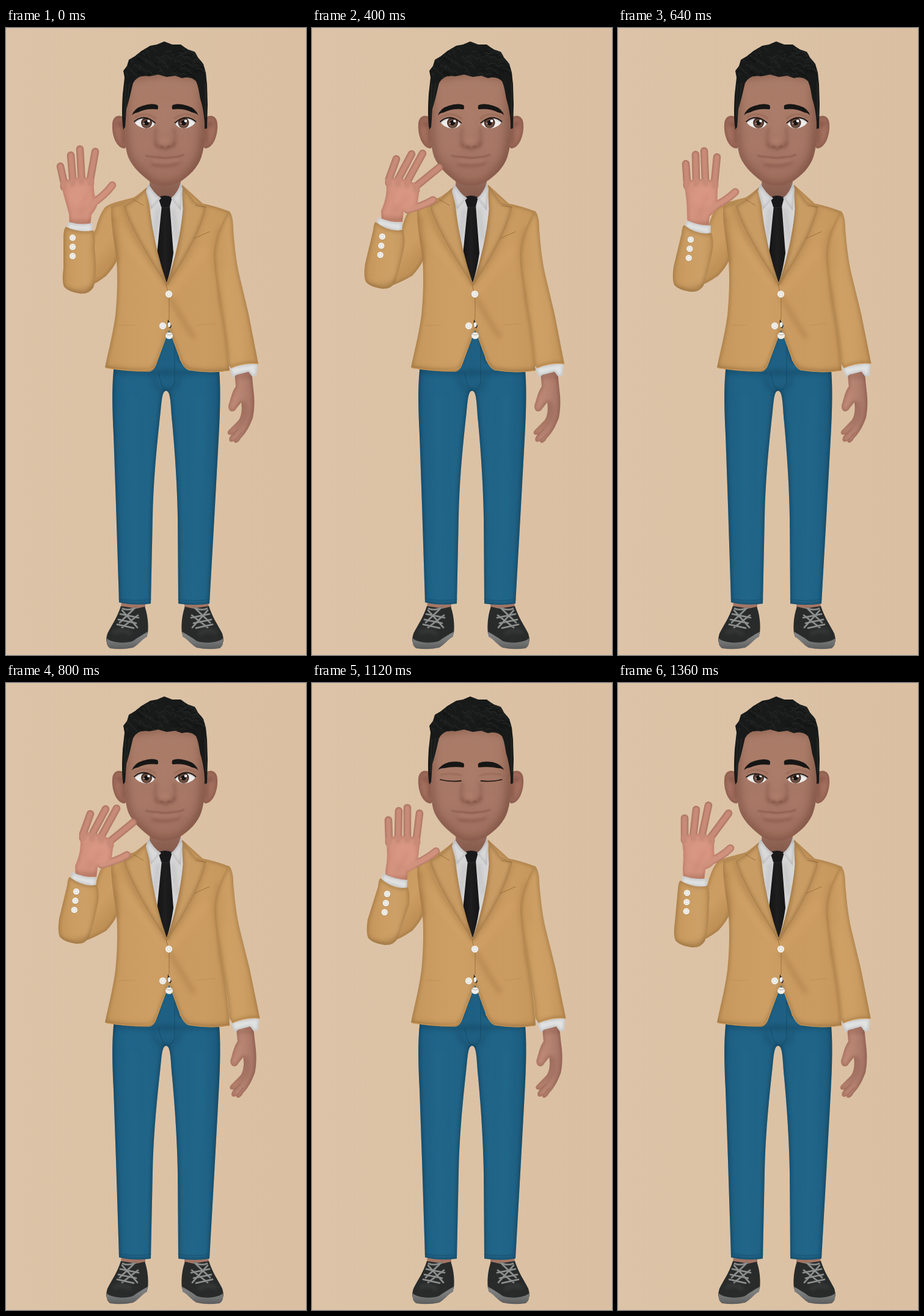
Write an HTML page with a canvas that moves like this. It is 491x1025 px and loops after 1440 ms.

```html
<!DOCTYPE html>
<html lang="en">
<head>
<meta charset="utf-8">
<title>Waving man</title>
<style>
html, body { margin: 0; height: 100%; overflow: hidden; background: #dcc2a5; }
canvas { display: block; width: 100vw; height: 100vh; }
</style>
</head>
<body>
<canvas id="stage" width="491" height="1025"></canvas>
<script>
const W = 491, H = 1025, STEP = 80, STEPS = 18;
const stage = document.getElementById('stage').getContext('2d');
let c = stage;

// ---------- helpers ----------
const path = d => new Path2D(d);
const fill = (d, style) => { c.fillStyle = style; c.fill(path(d)); };
function line(d, style, width) {
  c.strokeStyle = style;
  c.lineWidth = width;
  c.lineCap = c.lineJoin = 'round';
  c.stroke(path(d));
}
function disc(x, y, rx, style, ry = rx) {
  c.fillStyle = style;
  c.beginPath();
  c.ellipse(x, y, rx, ry, 0, 0, 7);
  c.fill();
}
function within(clip, paint, blur = 0) {
  c.save();
  if (clip) c.clip(path(clip));
  if (blur) c.filter = `blur(${blur}px)`;
  paint();
  c.restore();
}
function ramp(x0, y0, x1, y1, ...colors) {
  const g = c.createLinearGradient(x0, y0, x1, y1);
  colors.forEach((color, i) => g.addColorStop(i / (colors.length - 1), color));
  return g;
}
// Fill with a dark, soft inner rim
function solid(d, style, rim, width = 6, blur = 2.5) {
  fill(d, style);
  within(d, () => line(d, rim, width), blur);
}
function mirrored(paint, axis) {
  for (const side of [1, -1]) {
    c.save();
    if (side < 0) c.transform(-1, 0, 0, 1, 2 * axis, 0);
    paint(side);
    c.restore();
  }
}
const random = n => { const s = Math.sin(n * 127.1 + 3.7) * 43758.5453; return s - Math.floor(s); };

function button(x, y, r = 6) {
  disc(x, y + .6, r, '#b8935f');
  disc(x, y, r - .3, '#f1f0ec');
  c.strokeStyle = '#d5d3ce';
  c.lineWidth = .8;
  c.beginPath();
  c.arc(x, y, r * .5, 0, 7);
  c.stroke();
}

const CLOTH = '#cc9e64', RIM = 'rgba(112,76,34,.3)';

// ---------- still parts ----------
function trousers() {
  const d = 'M177 548L176 560C173 590 174 625 176 665L180 780L185 939Q210 945 237 941L240 800C241 750 245 700 251 645C255 615 254 594 262 593C270 594 269 615 272 645C277 700 280 750 281 800L282 941Q308 945 333 941L341 800L347 690C350 640 352 595 349 560V548L285 544L272 485H262L244 548Z';
  solid(d, ramp(174, 0, 351, 0, '#1d5d80', '#206589', '#206487', '#1e5f82', '#206487', '#206589', '#1c5a7b'), 'rgba(10,40,60,.35)');
  within(d, () => {
    line('M176 560Q260 567 350 560', 'rgba(8,35,55,.35)', 6);
    line('M240 572Q244 590 260 593M284 572Q280 590 264 593', 'rgba(10,40,60,.3)', 4);
    line('M208 610L211 935M316 610L307 935', 'rgba(42,115,150,.12)', 18);
  }, 4);
  line('M250 564Q253 584 260 591M276 520V580Q273 588 268 592', 'rgba(12,50,74,.5)', .8);
  line('M185 933Q210 938 237 934M282 934Q308 938 333 934', '#195272', 1);
}

function shoe() {
  fill('M189 938H228V957H187Z', '#a47564');
  fill('M188 945C182 964 173 976 166 990C163 1000 163 1008 172 1010Q190 1014 207 1009C216 1001 222 996 232 990C234 974 231 956 227 946L214 949Z', '#282b2a');
  fill('M165 998C173 1005 196 1007 208 1002C215 997 224 991 232 987L231 995C222 1000 216 1009 208 1013Q190 1017 170 1014Q163 1009 165 998Z', ramp(0, 994, 0, 1016, '#7e7f7f', '#707171', '#595a5a'));
  within(null, () => line('M177 988Q190 981 203 990', '#3a3e3c', 5), 3);
  const laces = 'M191 949Q199 953 212 948M187 958L217 964M184 967L213 973M182 975L209 981M209 950L186 972M216 960L190 980M190 952L215 980';
  line(laces, '#5f6463', 3.2);
  line(laces, '#8f9392', 1.9);
}

function shirtAndTie() {
  fill('M234 258L250 278H273L288 256L290 320L265 420L240 340Z', '#d5d5d6');
  within(null, () => line('M249 297L243 345M273 297L280 345', '#bdbdbf', 4), 3);
  fill('M255 290L268 290L274 368Q270 396 263 417Q252 396 247 370Z', ramp(247, 0, 274, 0, '#131315', '#1f1e1f', '#141416'));
  fill('M249 277Q260 271 272 277L268 292Q261 296 254 292Z', '#19191b');
  line('M254 292Q261 296 268 292', '#2d2c2d', 1);
}

function head() {
  // neck
  fill('M236 235H286V258L272 279H250L235 258Z', ramp(0, 245, 0, 275, '#976a5a', '#855b4d'));
  // ears
  mirrored(() => {
    const ear = 'M198 150C188 139 174 142 174 158C173 174 180 196 194 197L202 190Z';
    solid(ear, '#a36f5e', 'rgba(88,46,36,.3)', 5, 2.5);
    within(ear, () => line('M183 157Q189 152 194 165L193 188', 'rgba(110,66,53,.7)', 5), 3.5);
  }, 260);
  const face = 'M195 80L194 150C194 178 195 197 200 211C207 228 224 243 240 254Q262 263 284 252C300 242 315 227 320 210C326 190 327 168 327 140L325 80L262 70Z';
  solid(face, ramp(0, 75, 0, 260, '#a87b68', '#aa7c68', '#a77866', '#a47463', '#9a6a5a'), 'rgba(95,55,42,.35)', 14, 6);
  within(face, () => {
    fill('M316 90L330 90V230L298 250Q320 190 312 150Z', 'rgba(92,54,42,.18)');
    disc(228, 193, 19, 'rgba(180,130,110,.25)', 14);
    disc(291, 193, 17, 'rgba(180,128,108,.22)', 14);
    disc(259, 155, 8, 'rgba(184,138,118,.25)', 30);
    disc(261, 239, 27, 'rgba(175,124,105,.25)', 10);
  }, 8);
  within(null, () => {
    line('M246 165Q242 182 246 190M275 165Q279 184 274 191', 'rgba(135,90,75,.6)', 4);
    line('M245 190Q248 197 254 194Q260 201 267 194Q273 197 276 188', 'rgba(122,74,61,.7)', 3.5);
    line('M240 223Q262 229 283 221', 'rgba(125,78,65,.6)', 4);
    line('M241 217Q262 219 281 216', '#ad7a69', 4);
    disc(259, 184, 8, 'rgba(182,132,112,.5)', 6);
  }, 2.5);
  within(null, () => {
    line('M253 195Q255 193 257 195M264 195Q267 193 269 194', 'rgba(104,62,52,.6)', 1.6);
    line('M229 209Q238 211 248 211Q261 214 272 211Q284 211 291 207', 'rgba(112,68,56,.7)', 1.7);
  }, .8);
}

function hair() {
  const d = 'M192 166C189 150 190 124 191 108L194 81L192 70L198 62L201 52L211 46L221 38L236 29L247 27L259 22L272 27L286 27L297 35L309 39L314 48L323 59L327 73L329 92L330 125L329 164L325 165C326 150 322 128 318 116C316 105 315 96 311 87Q302 78 288 82L277 78L263 80L249 76L234 79Q216 75 208 90C205 101 202 118 197 132L195 162Z';
  fill(d, '#181a19');
  within(d, () => {
    for (let i = 0; i < 85; i++) {
      const x = 197 + 124 * random(i + 40), y = 33 + 46 * random(i + 150);
      const lean = (x - 258) / 8, len = 7 + 9 * random(i + 300);
      line(`M${x} ${y}q${lean + 4} ${-len / 2} ${lean + len} ${len * .4}`, i % 3 ? '#202321' : '#131514', 1.8);
    }
    line('M196 92L194 146M202 91L197 130M326 90L327 145', '#222523', 2);
  });
}

function jacket() {
  const d = 'M231 260C217 272 207 280 194 284L172 291C171 320 177 350 181 378C183 412 182 440 179 470C174 505 167 530 162 555Q192 562 234 562Q242 561 246 550L267 492L286 544Q292 557 299 559Q335 565 366 560C365 526 356 471 350 440C348 412 351 390 352 365L366 300Q343 291 322 287L288 256L290 296Q283 360 263 417Q244 363 236 305Z';
  solid(d, ramp(162, 0, 366, 0, '#c4965b', '#cb9d62', '#cd9f65', '#ca9b61', '#cb9c62', '#c5975c'), RIM);
  within(d, () => {
    line('M262 425L178 325M268 432L325 365', 'rgba(222,175,112,.14)', 18);
    line('M268 440Q287 475 307 505M176 312Q182 350 181 382M351 330Q336 365 352 420', 'rgba(115,75,33,.26)', 6);
    line('M192 292Q205 340 263 419Q309 355 326 295', 'rgba(105,67,28,.3)', 5);
    line('M162 556Q245 566 247 550M289 552Q310 566 366 558', 'rgba(105,67,28,.25)', 5);
  }, 4);
  const left = 'M231 262L211 280L193 291Q207 337 263 420Q243 356 236 305Z';
  const right = 'M288 258L309 285L327 293Q316 342 264 420Q287 355 290 296Z';
  for (const lapel of [left, right]) {
    solid(lapel, '#c99c63', 'rgba(105,69,32,.32)', 5);
    line(lapel, 'rgba(139,98,49,.45)', .8);
  }
  line('M208 280L225 290M310 290L327 293M308 344L333 333M262 419L267 441L267 476', 'rgba(139,98,49,.7)', 1);
  line('M186 486H210M313 486L342 483', 'rgba(139,98,49,.2)', 1);
  line('M164 556Q239 565 244 553L267 492L286 544Q292 557 299 559Q335 565 365 560', '#d19a52', 1);
  fill('M265 476L271 487L269 491L264 487Z', '#232321');
  disc(267, 485, 2.5, '#efeeea', 4);
  button(266.5, 435);
  button(256.5, 487);
  disc(267, 503, 6, '#f1efe9', 5.5);
  line('M262 500Q267 504 273 500', '#aaa9a5', 1);
  // shirt collar
  const flaps = ['M233 254L229 267L237 297L254 278Q241 270 233 254Z', 'M286 252L289 263L286 299L270 278Q282 269 286 252Z'];
  for (const flap of flaps) solid(flap, '#d9d9da', 'rgba(100,100,104,.35)', 3, 2);
}

// ---------- moving parts ----------
function eyes(blink) {
  const corner = 152 + 5 * blink, lid = 139 + 23 * blink;
  mirrored(side => {
    const top = `M210 ${corner + 1}Q226 ${lid} 244 ${corner + 3}`;
    if (blink < .95) within(`${top}Q241 164 228 164Q214 162 210 ${corner + 1}Z`, () => {
      fill('M205 140H250V168H205Z', '#eeecea');
      disc(230, 155, 9, '#4a332c');
      disc(230, 156, 7, '#6d4e41');
      disc(230, 155, 4, '#171313');
      disc(230 + 3.5 * side, 152, 2.3, '#fff');
      disc(230 - 4 * side, 156, 1.1, '#c6b4aa');
      within(null, () => line(top, 'rgba(20,15,15,.45)', 3), 1.2);
    });
    within(null, () => line(`M211 ${146 + 4 * blink}Q228 ${135 + 11 * blink} 245 ${148 + 3 * blink}`, 'rgba(98,57,45,.35)', 1.6), 1.2);
    line(top, '#211917', 1.8);
    const mid = 2.5 * blink, inner = 5 * blink;
    fill(`M206 143Q210 ${131 + mid} 224 ${127 + mid}Q239 ${122 + inner} 248 ${126 + inner}Q250 ${130 + inner} 248 ${133 + inner}Q230 ${131 + inner} 216 ${138 + mid / 2}Q209 139 206 143Z`, '#171615');
  }, 260.3);
}

function loweredArm(sway) {
  c.save();
  c.translate(352, 310);
  c.rotate(-sway / 245);
  c.translate(-352, -310);
  const hand = 'M374 562L376 586C369 596 368 606 364 617C363 628 373 630 377 622L385 612C387 623 385 638 379 643L364 658C360 663 365 667 370 664C361 672 366 680 373 675C373 681 381 678 384 671C394 661 400 648 404 637C407 623 407 606 405 592L402 562Z';
  solid(hand, ramp(365, 0, 407, 0, '#c48d7a', '#b68371', '#a37262'), 'rgba(92,47,37,.3)', 5);
  within(hand, () => line('M376 570H405M390 612Q396 632 387 645L372 664', 'rgba(95,52,40,.3)', 4), 3);
  line('M380 656L369 666M385 662L374 674', '#9a6757', 1);
  solid('M365 554L412 547L410 568L403 570L397 562L377 567L372 572Z', '#e1e2e2', 'rgba(120,123,125,.4)', 3, 2);
  const sleeve = 'M365 299Q372 306 372 329C374 354 376 378 382 404L397 467L413 549Q390 546 368 556L363 548C362 510 352 470 348 436Q341 400 340 371Q342 333 365 299Z';
  solid(sleeve, ramp(342, 0, 408, 0, '#c5975c', '#cd9f64', CLOTH, '#c4965b'), RIM);
  within(sleeve, () => line('M356 400Q372 450 381 540', 'rgba(218,168,101,.2)', 15), 7);
  line('M368 556Q390 546 413 549', '#d59a4e', 1);
  c.restore();
}

// x, y pairs: wrist, pinky base, index base, thumb base, then tips from pinky to thumb;
// the last three are the sleeve's upper left corner and the elbow's left edge.
const poses = [
  [122, 306, 84, 259, 124, 246, 139, 287, 71, 237, 85, 214, 99, 200, 123, 200, 157, 247, 98, 326, 96],
  [131, 311, 113, 251, 158, 251, 156, 293, 111, 222, 127, 207, 141, 201, 162, 211, 192, 268, 106, 323, 90],
  [138, 311, 126, 254, 171, 254, 165, 298, 125, 224, 142, 209, 156, 204, 176, 213, 203, 275, 110, 320, 90],
  [131, 303, 126, 247, 170, 259, 164, 294, 138, 214, 163, 206, 181, 205, 208, 228, 198, 281, 102, 318, 86],
  [124, 308, 109, 250, 152, 252, 152, 292, 109, 221, 128, 207, 148, 200, 181, 213, 184, 270, 100, 324, 92],
  [121, 308, 95, 253, 138, 247, 143, 288, 89, 226, 106, 208, 121, 198, 146, 202, 174, 257, 96, 326, 93]
];
// Position in the cycle of poses at each step
const phases = [5, 5.8, 6.8, 8, 8.55, 9, 10, 11.6, 13, 14.2, 15, 16.5, 18, 19, 20, 20.5, 21, 22];
const blinks = { 13: .5, 14: 1, 15: .75, 16: .35, 17: .14 };

function poseAt(phase) {
  const i = Math.floor(phase), u = phase - i;
  const [p, q, r, s] = [5, 6, 7, 8].map(k => poses[(i + k) % 6]);
  return q.map((b, k) => b + u / 2 * (r[k] - p[k] + u * (2 * p[k] - 5 * b + 4 * r[k] - s[k] + u * (3 * (b - r[k]) + s[k] - p[k]))));
}

function upperArm(elbow) {
  const d = `M212 276C192 282 172 285 162 293Q152 306 147 328L138 345L${elbow + 35} 412L${elbow + 44} 421Q${elbow + 55} 418 164 405Q178 390 183 377L200 300Z`;
  solid(d, ramp(145, 330, 184, 365, '#ca9c61', CLOTH, '#c09258'), RIM);
}

function raisedHand(p) {
  const [wx, wy, px, py, ix, iy, bx, by] = p;
  const fingers = [0, 1, 2, 3].map(k => {
    const x = px + (ix - px) * k / 3, y = py + (iy - py) * k / 3 - (k % 3 ? 3 : 0);
    return `M${x} ${y + 7}L${x} ${y}L${p[8 + 2 * k]} ${p[9 + 2 * k]}`;
  });
  const tx = p[16], ty = p[17];
  const thumb = `M${bx - 8} ${by + 3}Q${(bx + tx) / 2 + 2} ${(by + ty) / 2 + 3} ${tx} ${ty}`;
  const palm = `M${px - 6} ${py}Q${px} ${(py + wy) / 2 - 5} ${wx - 18} ${wy - 4}L${wx - 17} ${wy + 14}H${wx + 17}L${wx + 19} ${wy - 3}Q${bx + 5} ${by + 8} ${bx + 7} ${by - 1}Q${ix + 4} ${iy + 25} ${ix + 6} ${iy}Q${(px + ix) / 2} ${Math.min(py, iy) - 8} ${px - 6} ${py}Z`;
  fingers.forEach(f => line(f, '#ad7563', 12.5));
  line(thumb, '#b37866', 12.5);
  solid(palm, '#d3937e', 'rgba(151,88,70,.35)', 5);
  within(null, () => {
    fingers.forEach(f => line(f, '#c78b77', 8.5));
    line(thumb, '#d0927d', 9);
  }, 1.3);
  within(palm, () => {
    disc((px + ix) / 2 + 4, (py + iy) / 2 + 25, 18, 'rgba(222,156,135,.5)', 18);
    line(`M${bx - 9} ${by - 18}Q${bx - 20} ${by - 3} ${wx + 2} ${wy - 1}`, 'rgba(171,101,82,.25)', 3);
    line(`M${wx - 20} ${wy + 9}H${wx + 21}`, 'rgba(125,70,52,.35)', 5);
  }, 3);
}

function forearm(p) {
  const [x, y, e] = p.slice(18);
  const tilt = 4 + .55 * (x - e), r = x + 47, ry = y + tilt, bottom = y + 108;
  const cuff = `M${x + 6} ${y - 9}Q${x + 26} ${y - 6 + tilt / 2} ${r - 1} ${ry - 13}L${r - 2} ${ry + 3}L${x + 3} ${y + 5}Z`;
  solid(cuff, '#e0e1e1', 'rgba(125,127,129,.4)', 3, 2);
  const sleeve = `M${x + 2} ${y - 1}Q${x + 25} ${y + tilt + 4} ${r} ${ry - 1}Q${r + 4} ${ry + 10} ${r + 2} ${ry + 27}Q${e + 57} ${y + 79} ${e + 50} ${y + 98}Q${e + 43} ${bottom + 2} ${e + 27} ${bottom}Q${e + 9} ${bottom - 3} ${e + 2} ${y + 97}Q${e - 2} ${y + 88} ${e + 1} ${y + 67}L${x - 2} ${y + 13}Q${x - 1} ${y + 1} ${x + 2} ${y - 1}Z`;
  solid(sleeve, ramp(e, 0, r + 5, 0, '#c2945a', '#cb9d62', '#cda067', '#c5975c'), RIM);
  within(sleeve, () => line(`M${e} ${y + 104}Q${e + 28} ${bottom + 5} ${e + 54} ${y + 96}`, 'rgba(101,66,28,.3)', 8), 5);
  const slant = (x - e) / 8 - .4;
  for (let k = 0; k < 3; k++) button(x + 13 - slant * k, y + 12 + .85 * tilt + 15 * k, 5.5);
}

// ---------- scene ----------
const still = document.createElement('canvas');
still.width = W;
still.height = H;
c = still.getContext('2d');
mirrored(shoe, 260);
trousers();
head();
hair();
shirtAndTie();
jacket();
c = stage;

function draw(step) {
  const pose = poseAt(phases[step]);
  c.fillStyle = ramp(0, 0, W, 0, '#ddc3a7', '#dcc2a5', '#dabfa2');
  c.fillRect(0, 0, W, H);
  upperArm(pose[20]);
  c.drawImage(still, 0, 0);
  loweredArm(3 * Math.max(0, Math.sin(Math.PI * (step - 6) / 12)));
  eyes(blinks[step] || 0);
  raisedHand(pose);
  forearm(pose);
}

let shown = -1;
const start = performance.now();
function tick() {
  const step = Math.floor((performance.now() - start) / STEP) % STEPS;
  if (step !== shown) draw(shown = step);
  requestAnimationFrame(tick);
}
tick();
</script>
</body>
</html>
```
